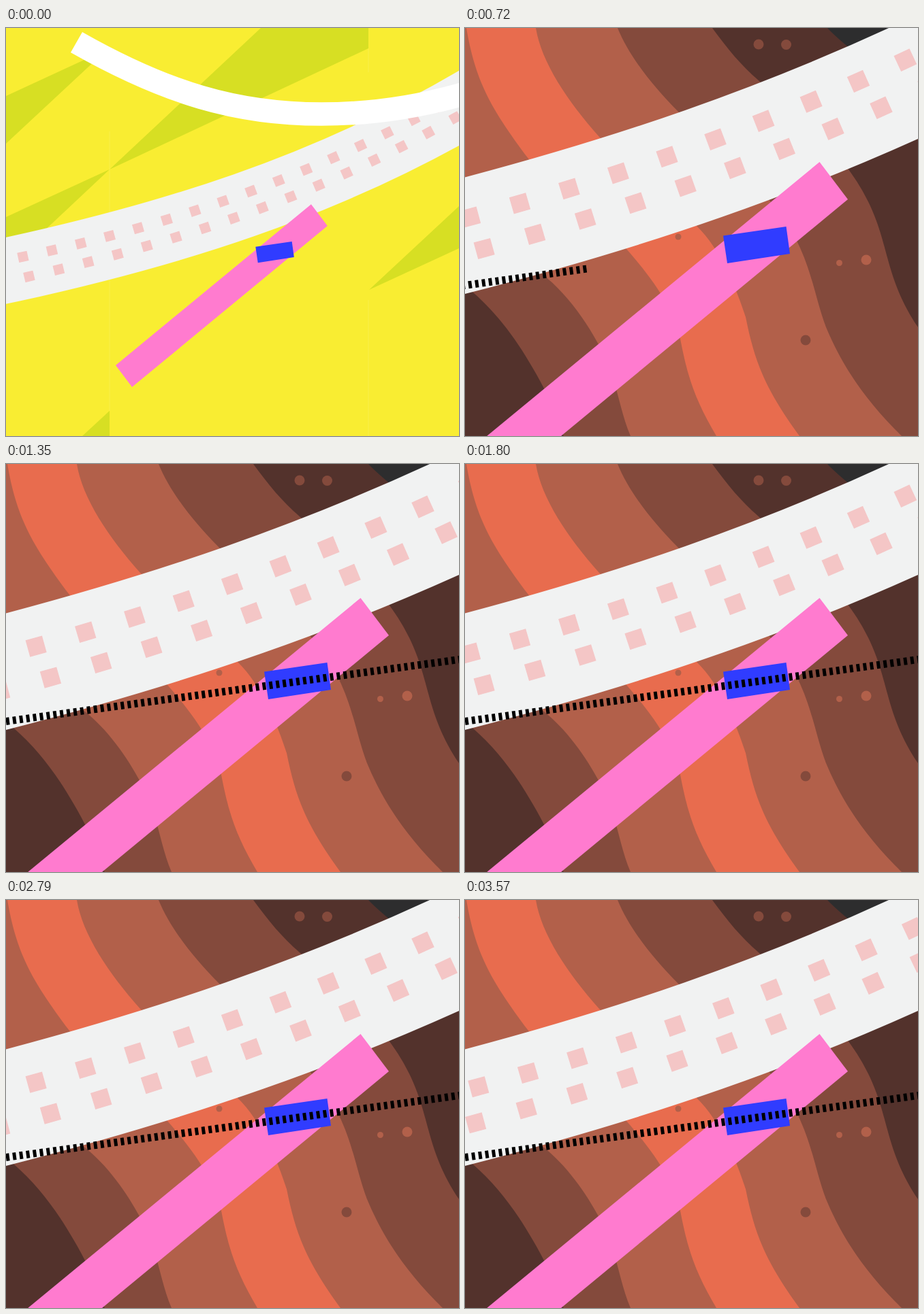
An HTML page that plays this animation: 665x600 px, repeating every 3600 ms.

```html
<!DOCTYPE html>
<html lang="en">
<head>
<meta charset="utf-8">
<title>Zooming road</title>
<style>
  html, body { margin: 0; width: 100%; height: 100%; overflow: hidden; }
  svg { display: block; width: 665px; height: 600px; }
</style>
</head>
<body>
<svg viewBox="0 0 665 600" fill="none">
  <g id="meadow">
    <path fill="#f9ed32" d="M0 0H665V600H0Z"/>
    <path fill="#d7df23" d="M0 100L149 31L0 170Z M374 0H532V30L152 208Z M0 278L152 208L0 351Z M665 262L533 385L665 324Z M152 563V600H112Z"/>
    <path stroke="#fff" stroke-opacity=".12" d="M152 152V563M532 30V65M532 400V600"/>
  </g>
  <g id="canyon">
    <path fill="#53322c" d="M0 0H665V600H0Z"/>
    <path fill="#844a3c" d="M-60 0V330C-20 360 -10 375 12 389C52 424 85 470 117 532S130 575 145 600H665V0Z"/>
    <path fill="#b2604a" d="M-10 0V260C30 300 75 335 112 361C157 395 192 453 211 495C225 535 230 570 243 600H665V0Z"/>
    <path fill="#e86c4e" d="M2 0C15 75 35 115 93 192C140 245 190 280 237 325C285 380 305 415 316 457C328 520 340 550 369 600H665V0Z"/>
    <path fill="#b2604a" d="M104 0C112 50 150 107 197 160C245 210 300 250 340 291C375 325 398 382 412 425C425 490 440 530 491 600H665V0Z"/>
    <path fill="#844a3c" d="M224 0C240 40 275 85 313 123C375 180 450 240 488 315C510 360 515 400 530 440C555 500 590 550 641 600H665V0Z"/>
    <path fill="#53322c" d="M363 0C385 30 405 55 432 78C480 125 530 160 563 208C630 300 605 350 665 440V0Z"/>
    <path fill="#2d2d2e" d="M532 0Q545 14 575 38H665V0Z"/>
    <g fill="#844a3c">
      <circle cx="431" cy="24" r="7.5"/>
      <circle cx="471.5" cy="24.5" r="7.5"/>
      <circle cx="500" cy="459" r="7.5"/>
    </g>
    <g fill="#b2604a">
      <circle cx="313" cy="307" r="4.5"/>
      <circle cx="549.5" cy="345.5" r="4.5"/>
      <circle cx="589" cy="341" r="7.5"/>
    </g>
  </g>
  <g id="scene">
    <path stroke="#f1f2f2" stroke-width="166" d="M-338 383.5L-238 362.5C154 276 546 159 938 -71.5L1038 -130.5"/>
    <g stroke="#f4c6c6" stroke-width="25.3" transform="translate(1.2 .8)">
      <path id="upper" d="M-361.2 361.7L-214 330C117.5 259.4 449 151 780.5 -20L930 -95"/>
      <path id="lower" d="M-349.3 415.8L-198.6 380.4C162.4 297 523.5 182 884.5 -23.4L950 -60"/>
    </g>
    <path stroke="#fff" stroke-width="59.8" d="M-76.5 -215.8C152 -86 332 -32.8 546.6 -32.8Q721.6 -32.8 896.6 -81L992 -108"/>
    <path fill="#ff7bcf" d="M520.5 197L562 252L64.8 663L23.2 607.4Z"/>
    <path fill="#303cff" d="M379 305.5L471.5 292L477 332L385 346Z"/>
  </g>
  <path id="track" stroke="#000" stroke-width="11" stroke-dasharray="5 5" transform="translate(0 378.5) rotate(-7.79)"/>
</svg>
<script>
  const LOOP = 3600, CUT = 600;
  const ZOOM_FROM = 0.577, CX = 349, CY = 344;
  const SQUARE = 25.3, SQUARE_PERIOD = 180;
  const TRACK_SPEED = 1.488, TRACK_LENGTH = 905;
  const el = id => document.getElementById(id);
  const [meadow, canyon, scene, upper, lower, track] =
    ['meadow', 'canyon', 'scene', 'upper', 'lower', 'track'].map(el);

  const easeInOut = u => u < 0.5 ? 2 * u * u : 1 - 2 * (1 - u) ** 2;

  function slideSquares(row, spacing, direction, t) {
    row.setAttribute('stroke-dasharray', `${SQUARE} ${spacing - SQUARE}`);
    const phase = t / SQUARE_PERIOD % 1;
    row.setAttribute('stroke-dashoffset', SQUARE / 2 - direction * phase * spacing);
  }

  function draw(t) {
    const zoom = ZOOM_FROM + (1 - ZOOM_FROM) * easeInOut(Math.min(1, t / CUT));
    scene.setAttribute('transform', `translate(${CX} ${CY}) scale(${zoom}) translate(${-CX} ${-CY})`);

    const inCanyon = t >= CUT;
    meadow.style.display = inCanyon ? 'none' : '';
    canyon.style.display = inCanyon ? '' : 'none';

    slideSquares(upper, 75.55, -1, t);
    slideSquares(lower, 77.4, 1, t);

    // Drawn from its head backwards, so the dashes travel with it.
    const head = Math.min(TRACK_LENGTH, (t - CUT) * TRACK_SPEED);
    track.setAttribute('d', head > 0 ? `M${head} 0H-5` : '');
  }

  const start = performance.now();
  function tick() {
    draw((performance.now() - start) % LOOP);
    requestAnimationFrame(tick);
  }
  tick();
</script>
</body>
</html>
```
